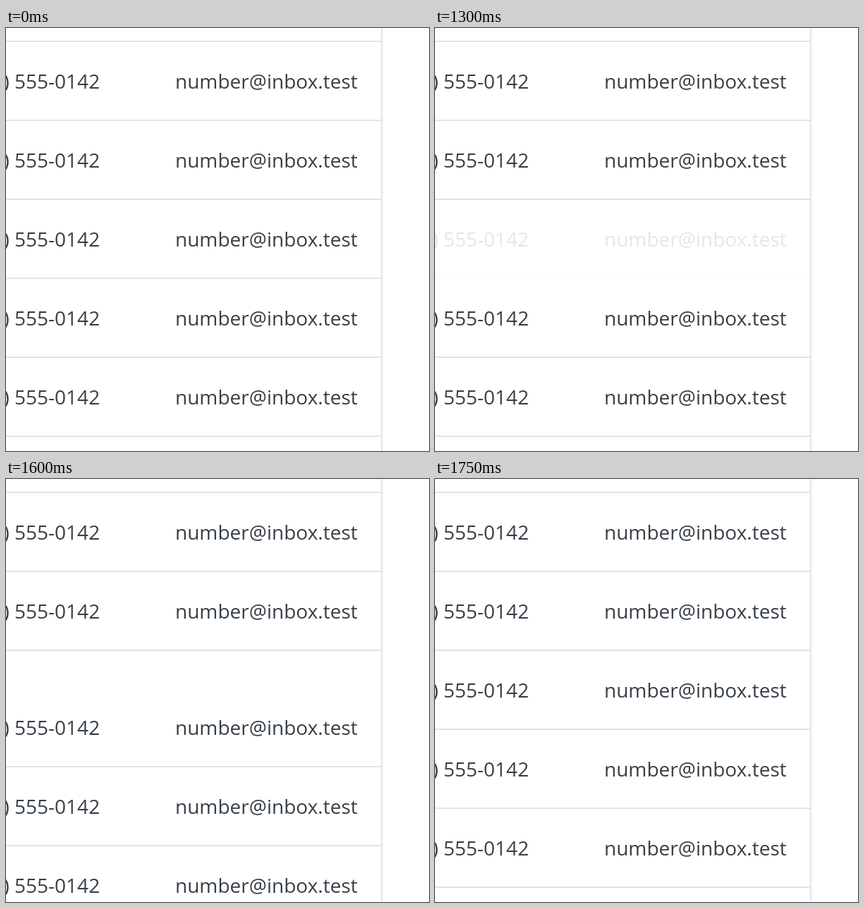
These frames come from a looping animation (600 px wide and 600 px high, 2200 ms). An HTML page:

```html
<!DOCTYPE html>
<html lang="en">
<head>
<meta charset="utf-8">
<title>Removing a table row</title>
<style>
  html, body { margin: 0; width: 100%; height: 100%; overflow: hidden; background: #fff; }
  svg { display: block; width: 100vw; height: 100vh; }
  text { font: 400 28px "Open Sans", "Noto Sans", sans-serif; fill: #373f47; }
  rect { fill: #e3e4e5; }
</style>
</head>
<body>
<svg id="stage" viewBox="0 0 600 600">
  <rect x="0" y="18" width="532" height="2"/>
  <rect x="532" y="0" width="2" height="600"/>
</svg>
<script>
const LOOP = 2200, STEP = 50;
const FADE_START = 1000, FADE_STEPS = 8;
const SLIDE_START = 1500, SLIDE = [0, 5, 29, 59, 85, 104, 112];
const ROW_HEIGHT = 112, ROW_COUNT = 6, REMOVED = 2;

const stage = document.getElementById("stage");

function add(parent, tag, attrs, content = "") {
  const node = document.createElementNS("http://www.w3.org/2000/svg", tag);
  for (const [name, value] of Object.entries(attrs)) node.setAttribute(name, value);
  node.textContent = content;
  return parent.appendChild(node);
}

const rows = Array.from({ length: ROW_COUNT }, (_, i) => {
  const top = 20 + i * ROW_HEIGHT;
  const row = add(stage, "g", {});
  add(row, "text", { x: -3.5, y: top + 66 }, ") 555-0142");
  add(row, "text", { x: 240, y: top + 66 }, "number@inbox.test");
  add(row, "rect", { x: 0, y: top + 110, width: 532, height: 2 });
  return row;
});

// Number of steps begun since start, from 0 to max
function stepsSince(start, time, max) {
  return Math.max(0, Math.min(max, Math.floor((time - start) / STEP) + 1));
}

function render(time) {
  const opacity = 1 - stepsSince(FADE_START, time, FADE_STEPS) / FADE_STEPS;
  const shift = SLIDE[stepsSince(SLIDE_START, time, SLIDE.length - 1)];
  rows[REMOVED].setAttribute("opacity", opacity);
  for (const row of rows.slice(REMOVED + 1)) {
    row.setAttribute("transform", `translate(0 ${-shift})`);
  }
}

const begin = performance.now();
function tick() {
  render((performance.now() - begin) % LOOP);
  requestAnimationFrame(tick);
}
tick();
</script>
</body>
</html>
```
